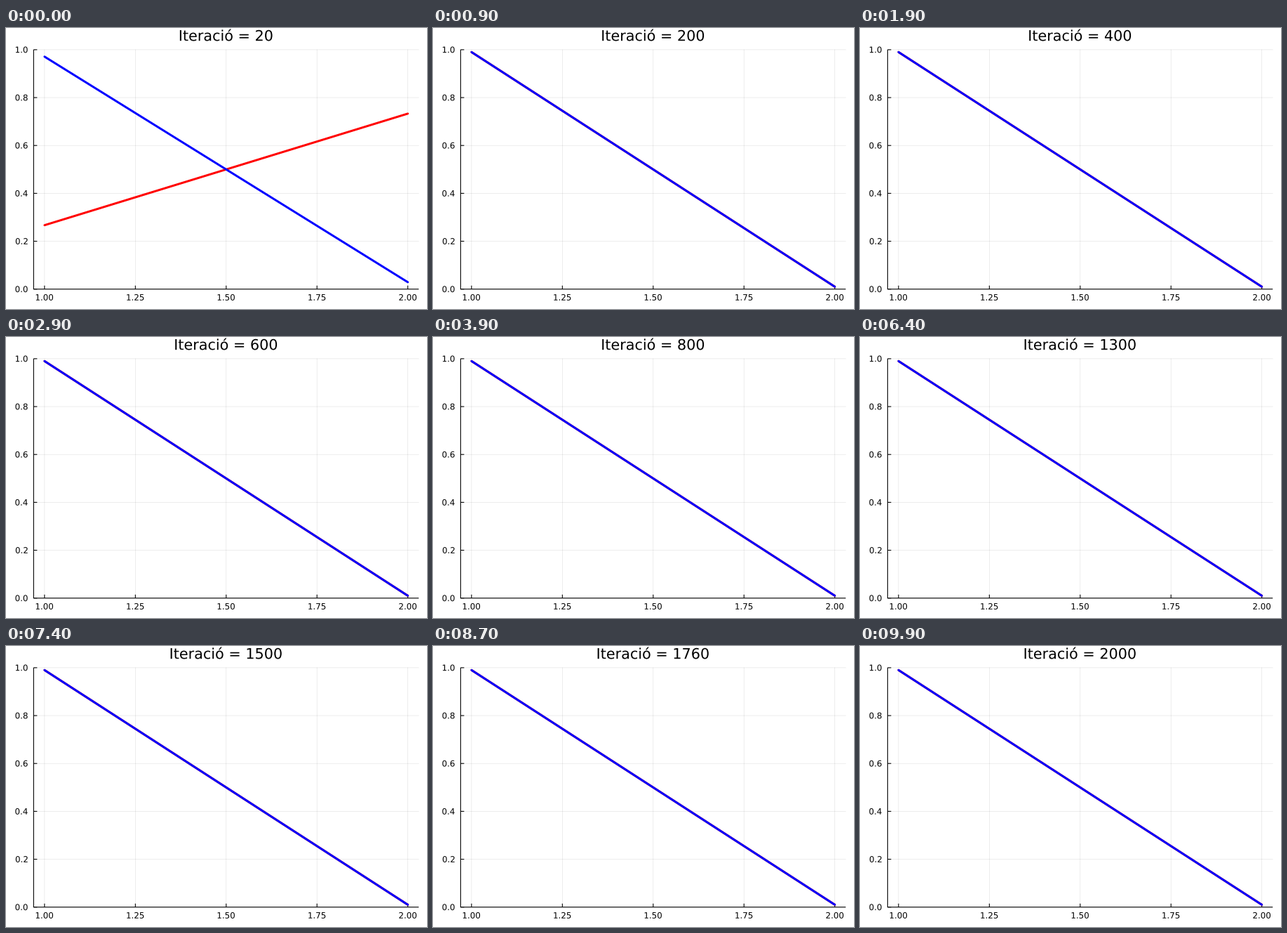
A matplotlib script that plays this animation: 600 by 400 pixels, repeating every 10 s.

```python
import matplotlib.pyplot as plt
import numpy as np
from matplotlib.animation import FuncAnimation
from matplotlib.patches import PathPatch
from matplotlib.textpath import TextPath
from matplotlib.transforms import Affine2D

plt.rcParams["font.family"] = "DejaVu Sans"
plt.rcParams["text.kerning_factor"] = 6  # plain advances, no pair kerning

W, H, DPI = 600, 400, 100
FRAMES, INTERVAL, STEP = 100, 100, 20
PX = 72 / DPI  # points per pixel

LEFT, RIGHT, TOP, BOTTOM = 39.37, 588.19, 30.9, 371.7
PAD = (RIGHT - LEFT) * 0.03 / 1.06
TITLE_SIZE, TICK_SIZE = 20.75, 11.86

fig = plt.figure(figsize=(W / DPI, H / DPI), dpi=DPI, facecolor="white")
ax = fig.add_axes([0, 0, 1, 1])
ax.set(xlim=(0, W), ylim=(H, 0))
ax.axis("off")


def to_x(v):
    return LEFT + PAD + (v - 1) * (RIGHT - LEFT - 2 * PAD)


def to_y(v):
    return BOTTOM - v * (BOTTOM - TOP)


def text_path(s, x, baseline, size, align=0.5):
    """Text outline whose ink is aligned at x (0.5 centre, 1 right)."""
    path = TextPath((0, 0), s, size=size)
    box = path.get_extents()
    shift = x - box.x0 - align * box.width
    return Affine2D().scale(1, -1).translate(shift, baseline).transform_path(path)


def add_text(*args, **kw):
    patch = PathPatch(text_path(*args, **kw), facecolor="black", linewidth=0)
    return ax.add_patch(patch)


def line(xs, ys, width, color="black", **kw):
    return ax.plot(xs, ys, color=color, lw=width * PX, snap=False, **kw)[0]


def logit(p):
    return np.log(p / (1 - p))


def strategy(start, rate, i):
    """Probability of the first action, growing logistically up to 0.99."""
    return min(0.99, 1 / (1 + np.exp(-logit(start) - rate * i)))


for v in np.linspace(1, 2, 5):
    x = to_x(v)
    line([x, x], [TOP, BOTTOM], 0.7, alpha=0.1)
    line([x, x], [BOTTOM, BOTTOM - 5], 1.1, solid_capstyle="butt")
    add_text(f"{v:.2f}", x, 387.7, TICK_SIZE)

for v in np.linspace(0, 1, 6):
    y = to_y(v)
    line([LEFT, RIGHT], [y, y], 0.7, alpha=0.1)
    line([LEFT, LEFT + 5], [y, y], 1.1, solid_capstyle="butt")
    add_text(f"{v:.1f}", 30.7, y + 4.3, TICK_SIZE, align=1)

line([LEFT, LEFT, RIGHT], [TOP, BOTTOM, BOTTOM], 1.1, solid_capstyle="butt")

ends = to_x(np.array([1, 2]))
red = line(ends, [0, 0], 3, "#ff0000", solid_capstyle="round", zorder=3)
blue = line(ends, [0, 0], 3, "#0000ff", solid_capstyle="round", zorder=4)
title = add_text("Iteració", 313.7, 18.2, TITLE_SIZE)


def update(i):
    for curve, start, rate in ((red, 0.267, 2.4), (blue, 0.971, 3.5)):
        p = strategy(start, rate, i)
        curve.set_ydata([to_y(p), to_y(1 - p)])
    label = f"Iteració = {STEP * (i + 1)}"
    title.set_path(text_path(label, 313.7, 18.2, TITLE_SIZE))
    return red, blue, title


anim = FuncAnimation(fig, update, frames=FRAMES, interval=INTERVAL,
                     repeat=True, repeat_delay=0)
plt.show()
```
